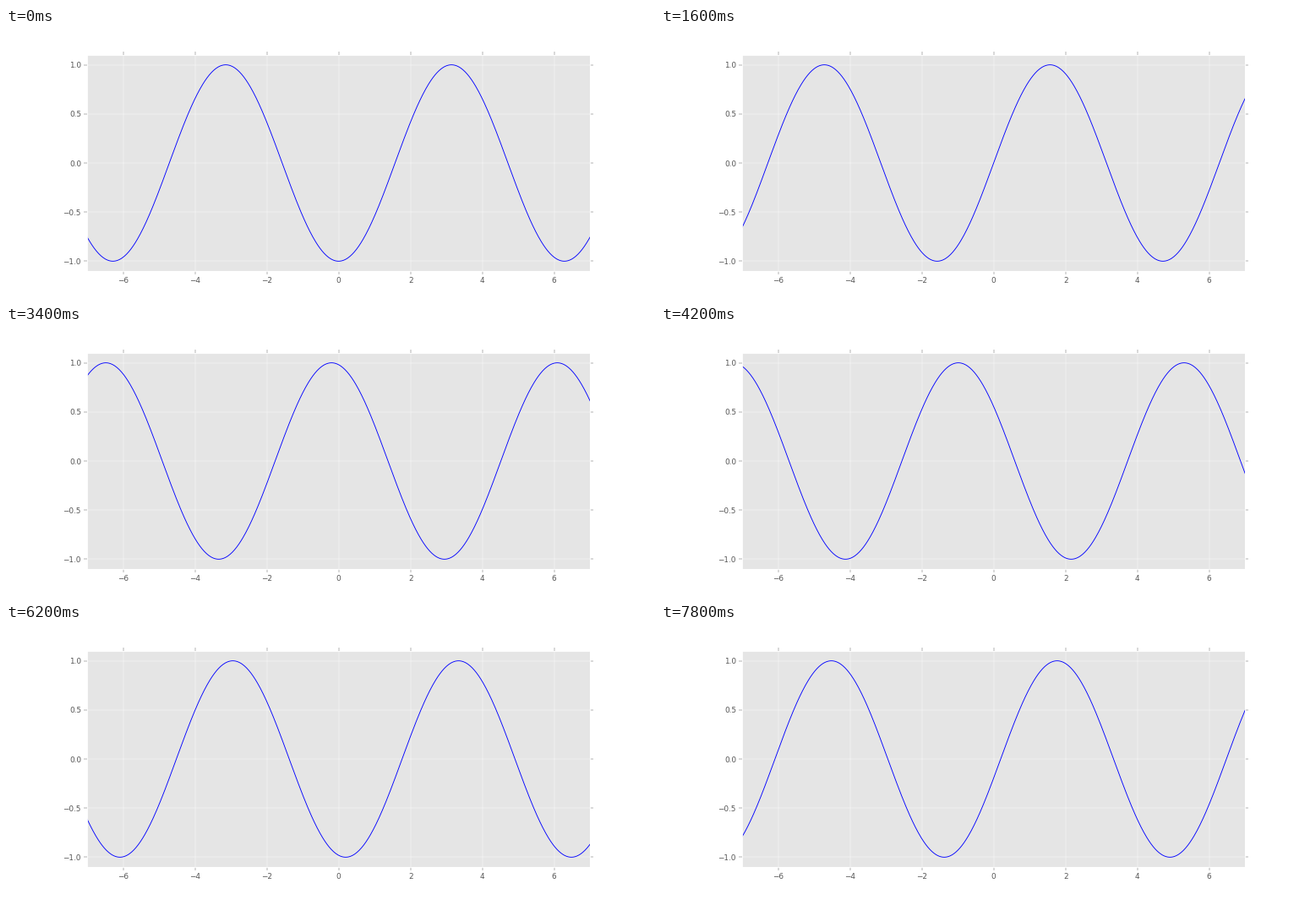
These frames come from a looping animation (768 px wide and 320 px high, 8000 ms). A matplotlib script:

```python
import numpy as np
import matplotlib.pyplot as plt
from matplotlib.animation import FuncAnimation

FRAMES = 40
INTERVAL = 200
STEP = 2 * np.pi / 32  # phase advance per frame
GREY = "#555555"

plt.rcParams["font.family"] = "DejaVu Sans"

fig = plt.figure(figsize=(12, 5), dpi=64, facecolor="white")
ax = fig.add_axes([0.125, 0.1, 0.775, 0.8], facecolor="#E5E5E5")
ax.set_xlim(-7, 7)
ax.set_ylim(-1.1, 1.1)
ax.set_xticks(range(-6, 7, 2))
ax.set_yticks(np.arange(-1, 1.1, 0.5))
ax.set_axisbelow(True)
ax.grid(True, color="white", linestyle="-", linewidth=0.5)
ax.tick_params(direction="out", length=4, width=0.5, pad=4, labelsize=10,
               color=GREY, labelcolor=GREY, top=True, right=True)
for spine in ax.spines.values():
    spine.set(color="white", linewidth=1)

x = np.linspace(-7, 7, 701)
line, = ax.plot(x, -np.cos(x), color="#0000ff", linewidth=1)


def draw(i):
    line.set_ydata(-np.cos(x + i * STEP))
    return line,


anim = FuncAnimation(fig, draw, frames=FRAMES, interval=INTERVAL,
                     init_func=lambda: draw(0), repeat=True, repeat_delay=0)
plt.show()
```
